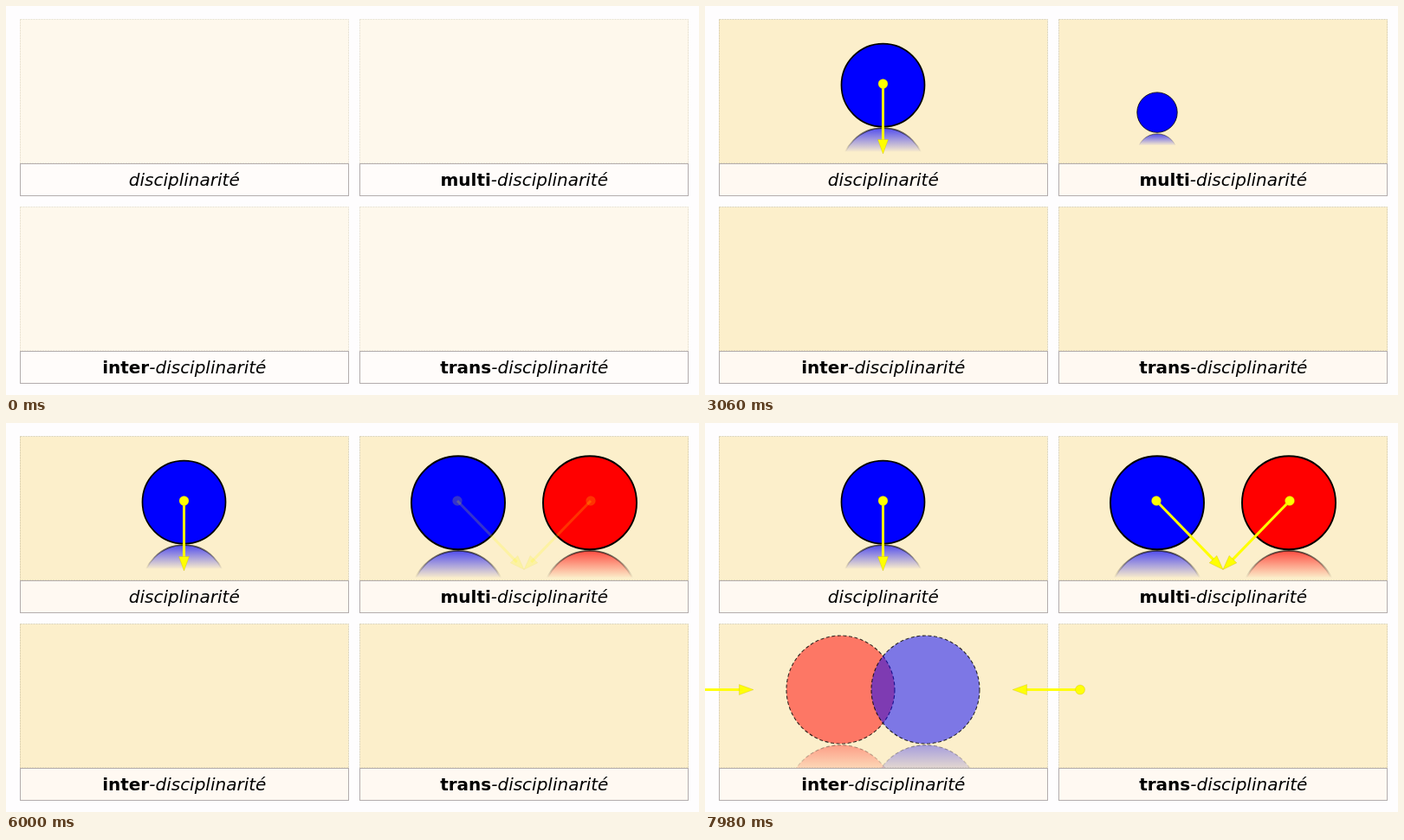
Animation, 800 px wide and 450 px high, one loop 8 s. Source, as an HTML page with a canvas:

```html
<!DOCTYPE html>
<html lang="fr">
<head>
<meta charset="utf-8">
<title>Disciplinarités</title>
<style>
  html, body { margin: 0; width: 100%; height: 100%; overflow: hidden; background: #fefdfe; }
  canvas { display: block; }
</style>
</head>
<body>
<canvas id="stage" width="800" height="450"></canvas>
<script>
const ctx = document.getElementById('stage').getContext('2d');
const LOOP = 8000, STEP = 60, TAU = Math.PI * 2;
const FONT = '"DejaVu Sans", Verdana, sans-serif';
const BLUE = [0, 0, 255], RED = [255, 0, 0], YELLOW = '#ffff00';
const PANELS = [
  { x: 16, y: 16, prefix: '' },
  { x: 408.5, y: 16, prefix: 'multi' },
  { x: 16, y: 233, prefix: 'inter' },
  { x: 408.5, y: 233, prefix: 'trans' }
];
const W = 379.5, H = 166.5;

const progress = (t, start, dur) => Math.min(1, Math.max(0, (t - start) / dur));
const ease = u => (1 - Math.cos(Math.PI * u)) / 2;
const eased = (t, start, dur) => ease(progress(t, start, dur));
const rgba = (c, a) => `rgba(${c.join()},${a})`;

function panel(p, fade) {
  ctx.fillStyle = `rgba(252,239,203,${fade})`;
  ctx.fillRect(p.x, p.y - 0.5, W, H);
  ctx.strokeStyle = `rgba(190,182,155,${0.25 + 0.3 * fade})`;
  ctx.lineWidth = 1;
  ctx.setLineDash([2, 1]);
  ctx.strokeRect(Math.floor(p.x) + 0.5, p.y - 0.5, W - 0.5, H);
  ctx.setLineDash([]);
}

function caption(p, fade) {
  const top = p.y + H, x = Math.floor(p.x) + 0.5;
  ctx.fillStyle = '#fefdfe';
  ctx.fillRect(x, top, W - 0.5, 37);
  ctx.fillStyle = `rgba(255,249,242,${fade})`;
  ctx.fillRect(x, top, W - 0.5, 37);
  ctx.strokeStyle = '#b3adad';
  ctx.lineWidth = 1;
  ctx.strokeRect(x, top, W - 0.5, 37);

  const bold = `bold 20px ${FONT}`, italic = `italic 20px ${FONT}`;
  const rest = (p.prefix ? '-' : '') + 'disciplinarité';
  ctx.font = bold;
  const boldW = ctx.measureText(p.prefix).width;
  ctx.font = italic;
  const left = p.x + W / 2 - (boldW + ctx.measureText(rest).width) / 2;
  ctx.fillStyle = '#000';
  ctx.fillText(rest, left + boldW, top + 25.5);
  ctx.font = bold;
  ctx.fillText(p.prefix, left, top + 25.5);
}

// A disc standing on the line y = base, mirrored below with a fading gradient.
function ball(x, base, r, color, { fill = 1, alpha = 1, dashed = false } = {}) {
  if (r < 0.3 || alpha <= 0) return;
  const line = dashed ? 1.1 : r * 0.036;
  ctx.save();
  ctx.globalAlpha = alpha;
  ctx.lineWidth = line;
  if (dashed) ctx.setLineDash([4, 2.6]);
  ctx.beginPath();
  ctx.arc(x, base - r, r, 0, TAU);
  ctx.fillStyle = rgba(color, fill);
  ctx.fill();
  ctx.strokeStyle = dashed ? 'rgba(0,0,0,.8)' : '#000';
  ctx.stroke();

  const top = base + 1.6, depth = r * 0.57;
  const fadeOut = c => {
    const g = ctx.createLinearGradient(0, top, 0, top + depth);
    g.addColorStop(0, rgba(c, 0.68 * fill));
    g.addColorStop(1, rgba(c, 0.02));
    return g;
  };
  ctx.beginPath();
  ctx.rect(x - r - 3, top - line, 2 * r + 6, depth + line);
  ctx.clip();
  ctx.beginPath();
  ctx.arc(x, top + r, r, 0, TAU);
  ctx.fillStyle = fadeOut(color);
  ctx.fill();
  ctx.strokeStyle = fadeOut([0, 0, 0]);
  ctx.stroke();
  ctx.restore();
}

function arrow(x1, y1, x2, y2, alpha = 1) {
  if (alpha <= 0) return;
  const len = Math.hypot(x2 - x1, y2 - y1);
  ctx.save();
  ctx.globalAlpha = alpha;
  ctx.translate(x1, y1);
  ctx.rotate(Math.atan2(y2 - y1, x2 - x1));
  ctx.fillStyle = YELLOW;
  ctx.strokeStyle = 'rgba(190,170,0,.5)';
  ctx.lineWidth = 0.6;
  ctx.fillRect(0, -1.5, len - 12, 3);
  ctx.beginPath();
  ctx.arc(0, 0, 5.5, 0, TAU);
  ctx.fill();
  ctx.stroke();
  ctx.beginPath();
  ctx.moveTo(len, 0);
  ctx.lineTo(len - 16.5, -6);
  ctx.lineTo(len - 16.5, 6);
  ctx.closePath();
  ctx.fill();
  ctx.stroke();
  ctx.restore();
}

function draw(t) {
  ctx.fillStyle = '#fefdfe';
  ctx.fillRect(0, 0, 800, 450);
  const fade = 0.36 + 0.64 * progress(t, 0, 780);
  PANELS.forEach(p => panel(p, fade));

  const grow = start => eased(t, start, 2000);
  ball(205.5, 139.6, 48 * grow(80), BLUE);
  ball(522, 146.3, 54 * grow(2150), BLUE);
  ball(674, 146.3, 54 * grow(3690), RED);

  // The two discs slide in from both sides, one slide width away.
  const discs = eased(t, 6040, 1500), far = 800 * (1 - discs);
  const soft = { fill: 0.5, alpha: discs, dashed: true };
  ball(156.5 - far, 371, 62.5, RED, soft);
  ball(254.5 + far, 371, 62.5, BLUE, soft);

  PANELS.forEach(p => caption(p, fade));

  const drop = eased(t, 1400, 1500), lift = 450 * (1 - drop);
  arrow(205.5, 90 - lift, 205.5, 171 - lift, drop);

  const pair = progress(t, 5940, 300);
  arrow(521, 90, 598, 169.5, pair);
  arrow(675, 90, 598, 169.5, pair);

  const push = eased(t, 6690, 1500), off = 800 * (1 - push);
  arrow(16 - off, 308.5, 94 - off, 308.5, push);
  arrow(395 + off, 308.5, 317 + off, 308.5, push);
}

const begin = performance.now();
function tick() {
  const t = (performance.now() - begin) % LOOP;
  draw(Math.floor(t / STEP) * STEP);
  requestAnimationFrame(tick);
}
tick();
</script>
</body>
</html>
```
